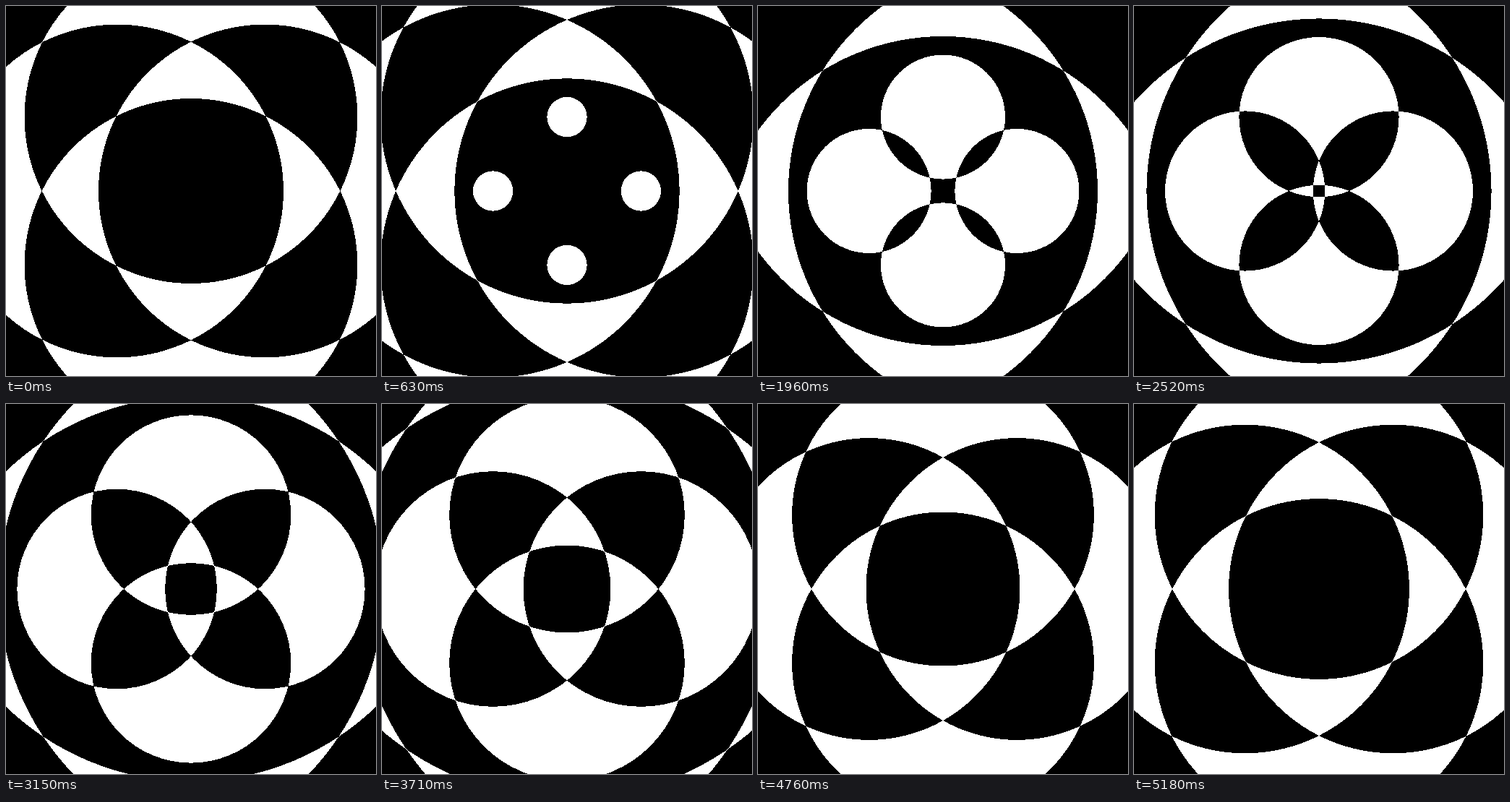
Write an HTML page that moves like this. It is 512x512 px and loops after 5250 ms.

```html
<!DOCTYPE html>
<html lang="en">
<head>
<meta charset="utf-8">
<title>Crossing rings</title>
<style>
  html, body { margin: 0; width: 100%; height: 100%; overflow: hidden; background: #000; }
  svg { display: block; width: 100%; height: 100%; isolation: isolate; }
  circle { fill: #fff; mix-blend-mode: difference; shape-rendering: crispEdges; }
</style>
</head>
<body>
<svg id="stage" viewBox="0 0 512 512"><rect width="512" height="512" fill="#000"/></svg>
<script>
  const SVG_NS = 'http://www.w3.org/2000/svg';
  const stage = document.getElementById('stage');
  const CENTER = 256;
  const OFFSET = 102.4;
  const GROWTH = 230.4; // radius gained per loop
  const timing = { duration: 5250, iterations: Infinity, easing: 'steps(75, end)' };

  function addCircle(dx, dy, from) {
    const circle = document.createElementNS(SVG_NS, 'circle');
    circle.setAttribute('cx', CENTER + dx * OFFSET);
    circle.setAttribute('cy', CENTER + dy * OFFSET);
    circle.setAttribute('r', from);
    stage.append(circle);
    const grow = circle.animate([{ r: from + 'px' }, { r: from + GROWTH + 'px' }], timing);
    grow.startTime = 0;
  }

  // Each generation takes over where the younger one ends, so the loop is seamless.
  for (const from of [0, GROWTH]) {
    for (const [dx, dy] of [[0, -1], [1, 0], [0, 1], [-1, 0]]) addCircle(dx, dy, from);
  }
</script>
</body>
</html>
```
